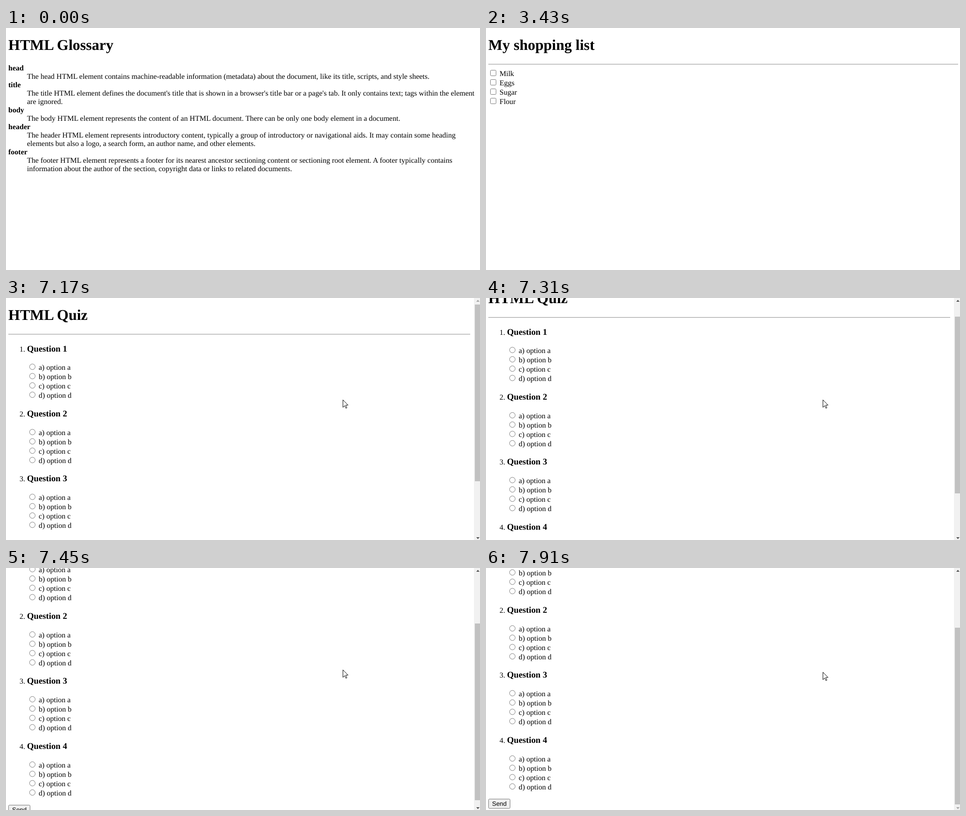
These frames come from a looping animation (1015 by 519 pixels, 8 s). An HTML page:

```html
<!DOCTYPE html>
<html lang="en">
<head>
<meta charset="utf-8">
<title>HTML practice pages</title>
<style>
html, body { margin: 0; width: 100%; height: 100%; overflow: hidden; background: #fff; }
svg { display: block; width: 1015px; height: 519px; }
text { font: 16px "Liberation Serif", "Times New Roman", serif; text-rendering: geometricPrecision; white-space: pre; }
.b { font-weight: bold; }
.h1 { font-size: 32px; font-weight: bold; }
.h3 { font-size: 18.72px; font-weight: bold; }
.ui { font: 13.333px "Liberation Sans", Arial, sans-serif; }
.hint { fill: #757575; }
.ctl { fill: #fff; stroke: #767676; }
.btn { fill: #efefef; stroke: #767676; }
</style>
</head>
<body>
<svg id="stage" viewBox="0 0 1015 519"></svg>
<script>
const LOOP = 8000;
const stage = document.getElementById('stage');

function add(parent, tag, attrs = {}, content = '') {
  const el = document.createElementNS('http://www.w3.org/2000/svg', tag);
  for (const k in attrs) el.setAttribute(k, attrs[k]);
  el.textContent = content;
  parent.appendChild(el);
  return el;
}
const group = parent => add(parent, 'g');
const text = (p, x, y, s, cls = '') => add(p, 'text', { x, y, class: cls }, s);
const fill = (p, x, y, width, height, color) => add(p, 'rect', { x, y, width, height, fill: color });
const box = (p, x, y, w, h, rx = 0, cls = 'ctl') =>
  add(p, 'rect', { x: x + .5, y: y + .5, width: w - 1, height: h - 1, rx, class: cls });
const line = (p, d, stroke, width = 1) =>
  add(p, 'path', { d, stroke, 'stroke-width': width, fill: 'none' });

function rule(p, y, right) {
  fill(p, 5, y, right - 5, 1, '#9a9a9a');
  fill(p, 5, y + 1, right - 5, 1, '#eee');
}
function button(p, x, y, w, label) {
  box(p, x, y, w, 21, 2, 'btn');
  text(p, x + 8, y + 15, label, 'ui');
}
function checkRow(p, x, base, label) {
  box(p, x, base - 13, 13, 13, 2);
  text(p, x + 20, base, label);
}

function buildGlossary() {
  const g = group(stage);
  text(g, 5, 47, 'HTML Glossary', 'h1');
  const entries = [
    ['head', 'The head HTML element contains machine-readable information (metadata) about the document, like its title, scripts, and style sheets.'],
    ['title', "The title HTML element defines the document's title that is shown in a browser's title bar or a page's tab. It only contains text; tags within the element", 'are ignored.'],
    ['body', 'The body HTML element represents the content of an HTML document. There can be only one body element in a document.'],
    ['header', 'The header HTML element represents introductory content, typically a group of introductory or navigational aids. It may contain some heading', 'elements but also a logo, a search form, an author name, and other elements.'],
    ['footer', 'The footer HTML element represents a footer for its nearest ancestor sectioning content or sectioning root element. A footer typically contains', 'information about the author of the section, copyright data or links to related documents.']
  ];
  let y = 91;
  for (const [term, ...lines] of entries) {
    text(g, 5, y, term, 'b');
    for (const s of lines) text(g, 45, y += 18, s);
    y += 18;
  }
  return g;
}

function buildContact() {
  const g = group(stage);
  // Grooved frame: a light outline shifted by one pixel under a dark one
  add(g, 'rect', { x: 8.5, y: 14.5, width: 1000, height: 288, fill: 'none', stroke: '#c0c0c0' });
  add(g, 'rect', { x: 7.5, y: 13.5, width: 1000, height: 288, fill: 'none', stroke: '#6c6c6c' });
  fill(g, 21, 12, 54, 4, '#fff');
  text(g, 23, 19, 'Contact');

  text(g, 21, 43, 'Subject');
  box(g, 73, 29, 71, 19);
  text(g, 78, 43, 'Support', 'ui');
  line(g, 'M130.5 36.5 L134 40 L137.5 36.5', '#000', 2);

  [['Name', 'Your name'], ['Email', 'inbox@notes.test']].forEach(([label, hint], i) => {
    const y = 48 + 21 * i;
    text(g, 21, y + 15, label);
    box(g, 63, y, 177, 21, 1);
    text(g, 67, y + 15, hint, 'ui hint');
  });

  text(g, 21, 246, 'Message');
  box(g, 81, 90, 390, 156);
  line(g, 'M461 244.5 L469.5 236 M465.5 244.5 L469.5 240.5', '#767676');
  checkRow(g, 25, 266, 'I agree to receive communications by email');
  button(g, 21, 270, 54, 'Enviar');
  return g;
}

function buildShopping() {
  const g = group(stage);
  text(g, 5, 47, 'My shopping list', 'h1');
  rule(g, 77, 1011);
  ['Milk', 'Eggs', 'Sugar', 'Flour'].forEach((s, i) => checkRow(g, 9, 103 + 20 * i, s));
  return g;
}

function buildQuiz() {
  const g = group(stage), page = group(g);
  text(page, 5, 47, 'HTML Quiz', 'h1');
  rule(page, 77, 994);
  for (let q = 0; q < 4; q++) {
    const top = q * 139.44, base = Math.round(114.5 + top);
    text(page, 29, base, `${q + 1}.`);
    text(page, 45, base, `Question ${q + 1}`, 'h3');
    [...'abcd'].forEach((c, i) => {
      const y = Math.round(154.3 + top) + 20 * i;
      add(page, 'circle', { cx: 56.5, cy: y - 6.5, r: 6, class: 'ctl' });
      text(page, 70, y, `${c}) option ${c}`);
    });
  }
  button(page, 5, 653, 47, 'Send');

  fill(g, 1002, 0, 13, 519, '#f1f1f1');
  const thumb = fill(g, 1004, 14, 11, 379, '#c1c1c1');
  const up = add(g, 'polygon', { points: '1007,8 1010.5,4 1014,8' });
  const down = add(g, 'polygon', { points: '1007,513 1014,513 1010.5,517' });
  const cursor = add(g, 'path', {
    d: 'M.5 .5 V16.5 L4.2 13 L6.8 18.5 L9 17.5 L6.5 11.8 H11.5 Z',
    fill: '#fff', stroke: '#000'
  });
  return { g, page, thumb, up, down, cursor };
}

const quiz = buildQuiz();
const scenes = [
  [0, buildGlossary()], [500, buildContact()], [3430, buildShopping()], [6230, quiz.g]
];
const BOTTOM = 158;

// Value of the last [time, value] pair already reached
const held = (keys, t) => keys.reduce((v, [at, next]) => t >= at ? next : v, keys[0][1]);
const scrollKeys = [[0, 0], [7240, 6], [7310, 36], [7380, 94], [7450, 145], [7520, BOTTOM]];
const nudgeKeys = [[0, 0], [7790, 1], [7850, 3], [7910, 5]];

function cursorAt(t) {
  const step = Math.floor((t - 6820) / 70);
  const left = Math.pow(1 - Math.min(1, step / 5), 2);
  return [Math.round(721 + 150 * left), Math.round(218 + 250 * left) + held(nudgeKeys, t)];
}

function draw(t) {
  const current = held(scenes, t);
  for (const [, g] of scenes) g.setAttribute('display', g === current ? 'inline' : 'none');

  const y = held(scrollKeys, t);
  quiz.page.setAttribute('transform', `translate(0 ${-y})`);
  quiz.thumb.setAttribute('y', 14 + Math.round(y * 114 / BOTTOM));
  quiz.up.setAttribute('fill', y > 0 ? '#505050' : '#a3a3a3');
  quiz.down.setAttribute('fill', y < BOTTOM ? '#505050' : '#a3a3a3');
  quiz.cursor.setAttribute('display', t >= 6820 ? 'inline' : 'none');
  quiz.cursor.setAttribute('transform', `translate(${cursorAt(Math.max(t, 6820))})`);
}

const start = performance.now();
function tick() {
  draw((performance.now() - start) % LOOP);
  requestAnimationFrame(tick);
}
tick();
</script>
</body>
</html>
```
